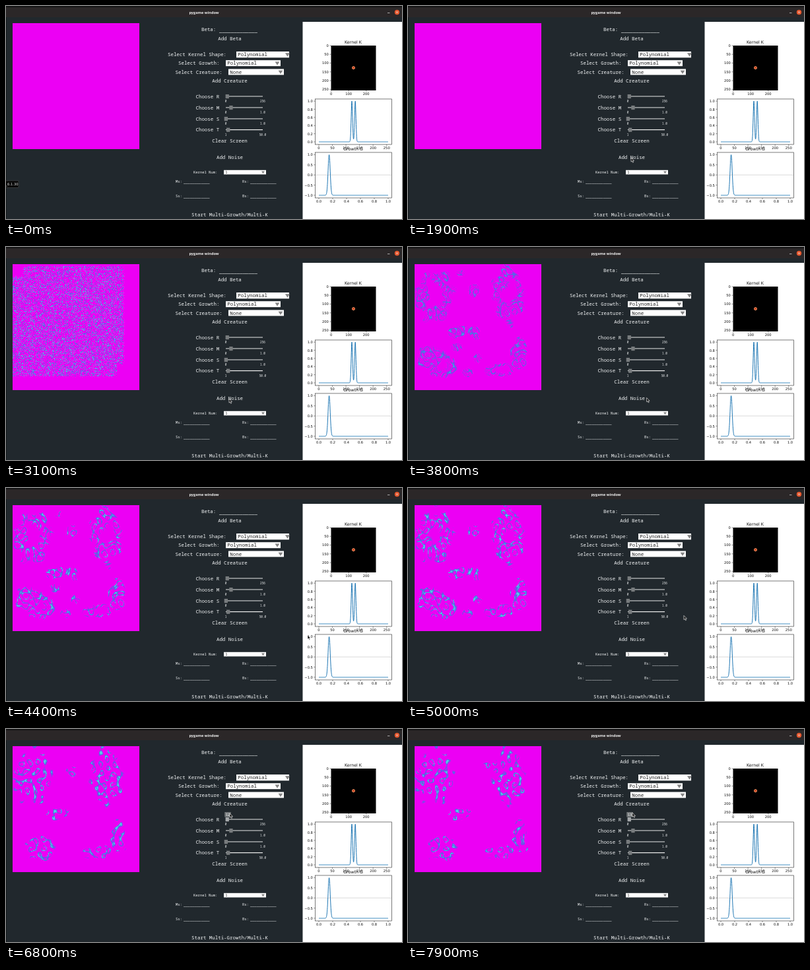
Write an HTML page with a canvas that moves like this. It is 600 px wide and 323 px high and loops after 8 s.

```html
<!DOCTYPE html>
<html lang="en">
<head>
<meta charset="utf-8">
<title>pygame window</title>
<style>
  html, body { margin: 0; width: 100%; height: 100%; overflow: hidden; background: #21282d; }
  svg, canvas { position: absolute; display: block; }
  svg { left: 0; top: 0; }
  canvas { left: 10px; top: 26px; }
  text { white-space: pre; }
  .mono { font-family: "Noto Sans Mono", "DejaVu Sans Mono", monospace; }
  .plot { font-family: "DejaVu Sans", sans-serif; }
  .title { font-family: "Open Sans", sans-serif; font-weight: 700; }
</style>
</head>
<body>
<svg id="stage" width="600" height="323" viewBox="0 0 600 323"></svg>
<canvas id="world" width="192" height="191"></canvas>
<script>
const LOOP = 8000, STEP = 100;
const stage = document.getElementById('stage');
const clamp = v => Math.max(0, Math.min(1, v));
const ramp = (v, a, b) => clamp((v - a) / (b - a));
const smooth = (v, a, b) => { const u = ramp(v, a, b); return u * u * (3 - 2 * u); };
const mix = (a, b, u) => a + (b - a) * u;

function add(tag, attrs, content = '') {
  const node = document.createElementNS('http://www.w3.org/2000/svg', tag);
  for (const key in attrs) node.setAttribute(key, attrs[key]);
  node.textContent = content;
  return stage.appendChild(node);
}
const rect = (x, y, width, height, fill, extra) => add('rect', { x, y, width, height, fill, ...extra });
const path = (d, stroke, width = 1, extra) =>
  add('path', { d, stroke, 'stroke-width': width, fill: 'none', ...extra });
const label = (str, x, y, size, fill, anchor, family) =>
  add('text', { x, y, 'font-size': size, fill, 'text-anchor': anchor, class: family }, str);
const mono = (str, x, y, size = 7.43, anchor = 'start', fill = '#f2f4f5') =>
  label(str, x, y, size, fill, anchor, 'mono');
const plotText = (str, x, y, anchor = 'middle', size = 5.2) =>
  label(str, x, y, size, '#111', anchor, 'plot');
const show = (visible, ...nodes) => nodes.forEach(node => node.style.display = visible ? '' : 'none');

// Window frame
rect(0, 0, 600, 323, '#21282d');
rect(0, 0, 600, 17, '#2b2728');
rect(0, 0, 600, 2, '#141415');
rect(0, 17, 1, 306, '#14181a');
label('pygame window', 300, 11.7, 5.6, '#eee', 'middle', 'title');
path('M578 10.5h3.5', '#ccc', 0.8);
add('circle', { cx: 592.5, cy: 9.5, r: 3.7, fill: '#e4572e' });
path('M591.2 8.2l2.6 2.6m0 -2.6l-2.6 2.6', '#fff', 0.7);
const versionTip = [
  rect(-1, 265, 20, 10.5, '#080808', { stroke: '#555', 'stroke-width': 0.5 }),
  label('_6.1.30', -0.5, 272.2, 5.2, '#ddd', 'start', 'plot')
];

// Controls
function dropdown(caption, captionX, value, x, y, w, h, size = 7.43, arrowX = x + w - 5) {
  mono(caption, captionX, y + h / 2 + size * 0.36, size);
  rect(x, y, w, h, '#fff');
  mono(value, x + 2.3, y + h / 2 + size * 0.34, size, 'start', '#222');
  const r = h * 0.38, top = y + h * 0.25;
  add('path', { d: `M${arrowX - r} ${top}h${2 * r}l${-r} ${h * 0.58}z`, fill: '#858585' });
}
mono('Beta:', 296, 38.2);
mono('_____________', 323, 39.6);
for (const [caption, y] of [['Add Beta', 52], ['Add Creature', 115.7], ['Clear Screen', 207.3],
  ['Add Noise', 231.6], ['Start Multi-Growth/Multi-K', 318.6]]) mono(caption, 339, y, 7.43, 'middle');
dropdown('Select Kernel Shape:', 245, 'Polynomial', 349, 69, 80, 9.3, 7.43, 426.5);
dropdown('Select Growth:', 261, 'Polynomial', 333, 82.2, 83, 9);
dropdown('Select Creature:', 256.5, 'None', 337, 95.5, 84, 9);
dropdown('Kernel Num:', 284, '1', 330, 248.8, 64, 6.6, 5.5, 389.5);

function slider(name, y, low, high, thumbX) {
  mono('Choose ' + name, 287.5, y + 2.7);
  path(`M333 ${y}H389`, '#e8e8e8', 1.2);
  mono(low, 333, y + 9, 4.4, 'middle');
  mono(high, 389, y + 9, 4.4, 'middle');
  return rect(thumbX, y - 3, 5.3, 6.2, '#777b7d');
}
const thumbR = slider('R', 137, '0', '256', 332.6);
slider('M', 154, '0', '1.0', 338.3);
slider('S', 171, '0', '1.0', 330.7);
slider('T', 187.7, '1', '50.0', 334);
for (const [name, x, y] of [['Ms:', 257, 268], ['Rs:', 358, 268], ['Ss:', 257, 290.4], ['Bs:', 358, 290.4]]) {
  mono(name, x, y, 5.5);
  mono('____________', x + 12, y + 1, 5.5);
}

// Plots
rect(449.5, 24, 150.5, 299, '#fff');
const BLUE = '#1f77b4', AXIS = '#222';
function xTick(str, x, y) {
  path(`M${x} ${y}v2`, AXIS, 0.5);
  plotText(str, x, y + 7.4);
}
function yTick(str, x, y) {
  path(`M${x} ${y}h-2`, AXIS, 0.5);
  plotText(str, x - 3.6, y + 1.9, 'end');
}
const curve = (from, to, f) => {
  let d = '';
  for (let x = from; x <= to; x += 0.25) d += `${d ? 'L' : 'M'}${x} ${f(x).toFixed(2)}`;
  path(d, BLUE, 1, { 'stroke-linejoin': 'round' });
};
const bell = (x, center, sigma) => Math.exp(-(((x - center) / sigma) ** 2) / 2);
const axes = y => rect(468.5, y, 116, 69, 'none', { stroke: AXIS, 'stroke-width': 0.6 });

plotText('Kernel K', 526, 57, 'middle', 6.3);
rect(492.5, 60, 68, 68, '#000');
add('circle', { cx: 526.5, cy: 93.7, r: 2, fill: '#c8401c', stroke: '#ff9c6b', 'stroke-width': 1 });
for (let i = 0; i < 6; i++) yTick(i * 50, 492.5, 60 + i * 13.28);
for (let i = 0; i < 3; i++) xTick(i * 100, 492.7 + i * 26.5, 128);

axes(141);
for (let i = 0; i < 6; i++) {
  yTick((i / 5).toFixed(1), 468.5, 206 - i * 12.35);
  xTick(i * 50, 474 + i * 20.55, 210);
}
curve(474, 579, x => 206 - 61.8 * (bell(x, 524, 1) + bell(x, 529.2, 1)));

plotText('Growth G', 526, 219.2, 'middle', 6.3);
axes(222);
for (let i = 0; i < 5; i++) yTick((i / 2 - 1).toFixed(1).replace('-', '−'), 468.5, 287 - i * 15.4);
for (let i = 0; i < 6; i++) xTick((i / 5).toFixed(1), 474 + i * 21, 291);
path('M468.5 256.2H584.5', '#777', 0.7, { 'stroke-dasharray': '0.8 1.2' });
curve(474, 579, x => 287 - 61.5 * bell(x, 489.6, 1.6));

// Slider tooltip and pointer
const tip = rect(331.3, 126, 9.4, 7.5, '#777b7d');
const tipText = mono('12', 336, 131.8, 5.2, 'middle');
const pointer = add('path', {
  d: 'M0 0V6.2L1.5 5L2.6 7.4L3.6 6.9L2.6 4.6H4.5Z', fill: '#111', stroke: '#fff', 'stroke-width': 0.6
});
const pointerKeys = [
  [1000, 545, 300], [1800, 488, 255], [1801, 338, 230], [3600, 338, 230], [4300, 457, 223],
  [4600, 457, 223], [5600, 346, 139], [6300, 338, 132], [6800, 339, 128], [8000, 340, 127]
];
function movePointer(t) {
  show(t >= 1000, pointer);
  const i = pointerKeys.findIndex(key => key[0] > t);
  if (i < 1) return;
  const [a, b] = [pointerKeys[i - 1], pointerKeys[i]];
  const u = smooth(t, a[0], b[0]);
  pointer.setAttribute('transform', `translate(${mix(a[1], b[1], u)} ${mix(a[2], b[2], u)})`);
}

// Cellular world: random speckles that settle into drifting colonies
const W = 192, H = 191;
const ctx = document.getElementById('world').getContext('2d');
const image = ctx.createImageData(W, H);
let seed = 7;
const random = () => {
  seed = (seed + 0x6d2b79f5) | 0;
  let r = Math.imul(seed ^ (seed >>> 15), seed | 1);
  r ^= r + Math.imul(r ^ (r >>> 7), r | 61);
  return ((r ^ (r >>> 14)) >>> 0) / 4294967296;
};
const speckle = Float32Array.from({ length: W * H }, random);

// Sum of plane waves near one wavelength, with unit variance
function waveField(wavelength, count, drift) {
  const waves = Array.from({ length: count }, (_, i) => {
    const angle = (i + random()) * Math.PI / count;
    const k = 2 * Math.PI / wavelength * (0.8 + 0.4 * random());
    return [k * Math.cos(angle), k * Math.sin(angle), random() * 6.283, drift * (random() - 0.5)];
  });
  const gain = Math.sqrt(2 / count);
  return (x, y, s) => {
    let sum = 0;
    for (const [kx, ky, phase, speed] of waves) sum += Math.cos(kx * x + ky * y + phase + speed * s);
    return sum * gain;
  };
}
const wobble = waveField(24, 5, 0.4);
const shade = waveField(8, 5, 0.8);
const strands = waveField(12, 10, 1.2);

// x, y, radii, birth and death in seconds
const colonies = [
  [39, 71, 27, 38, 0, 9], [152, 71, 23, 41, 0, 9], [77, 129, 14, 11, 0, 9],
  [51, 179, 23, 18, 0, 9], [32, 168, 17, 20, 0, 5.6], [140, 186, 22, 11, 0, 9], [168, 163, 13, 25, 0, 9],
  [98, 67, 9, 9, 0, 7.4], [120, 55, 9, 5, 6.8, 9], [102, 130, 9, 9, 0, 6.1],
  [72, 152, 8, 6, 0, 5], [105, 168, 6, 7, 0, 6], [90, 190, 8, 6, 0, 6.1], [78, 39, 6, 4, 0, 5]
];
function colonyMask(x, y, s, hollow) {
  let best = 0, warp = null;
  for (const [cx, cy, rx, ry, birth, death] of colonies) {
    if (s < birth || s > death) continue;
    const dx = (x - cx) / rx, dy = (y - cy) / ry;
    let d = dx * dx + dy * dy;
    if (d > 1.7) continue;
    warp ??= wobble(x, y, s) * 0.13;
    d = Math.sqrt(d) + warp;
    const core = rx > 20 ? smooth(d, hollow - 0.2, hollow) : 1;
    const life = Math.min(ramp(s, birth, birth + 0.4), ramp(s, death, death - 0.5));
    best = Math.max(best, (1 - smooth(d, 0.88, 1.05)) * core * life);
  }
  return best;
}
const inNoise = (x, y) => x < 178 && y >= 29 && y < 196 &&
  !(x < 27 && y < 45) && !(x >= 168 && y >= 178);

function drawWorld(t) {
  const s = t / 1000;
  const hollow = mix(0.6, 0, ramp(s, 4.2, 6.4));
  const settled = smooth(s, 3.4, 4), clearing = smooth(s, 3.2, 3.8);
  // Thin loops around the wave crests close up into short worms
  const crest = mix(0.35, 0.95, ramp(s, 4.4, 7.6));
  const reach = mix(0.6, 0.8, ramp(s, 4.4, 7.6));
  for (let j = 0, i = 0; j < H; j++) for (let k = 0; k < W; k++, i++) {
    const x = k + 10, y = j + 26;
    let v = 0;
    if (s >= 2.8) {
      const mask = s > 3.2 ? colonyMask(x, y, s, hollow) : 0;
      if (settled && mask) {
        const line = 1 - smooth(Math.abs(strands(x, y, s) - crest), 0.1, reach);
        if (line) v = line * mask * settled * clamp(0.68 + 0.28 * shade(x, y, s));
      }
      if (settled < 1 && speckle[i] > 0.7 && inNoise(x, y)) {
        const grain = 0.3 + (speckle[i] - 0.7) * 2.3;
        v = Math.max(v, grain * (1 - clearing * (1 - mask)) * (1 - settled));
      }
    }
    const low = Math.min(1, v * 2), high = Math.max(0, v * 2 - 1), p = i * 4;
    image.data[p] = mix(236, 84, low);
    image.data[p + 1] = mix(mix(0, 100, low), 205, high);
    image.data[p + 2] = mix(244, 228, low);
    image.data[p + 3] = 255;
  }
  ctx.putImageData(image, 0, 0);
}

let shown = -1;
function draw(now) {
  const t = Math.floor((now % LOOP) / STEP) * STEP;
  if (t !== shown) {
    shown = t;
    const dragging = t >= 6300;
    show(t < 1000, ...versionTip);
    show(dragging, tip, tipText);
    tipText.textContent = t < 7300 ? '12' : '13';
    thumbR.setAttribute('fill', dragging ? '#a5a8aa' : '#777b7d');
    movePointer(t);
    drawWorld(t);
  }
  requestAnimationFrame(() => draw(performance.now() - start));
}
const start = performance.now();
draw(0);
</script>
</body>
</html>
```
